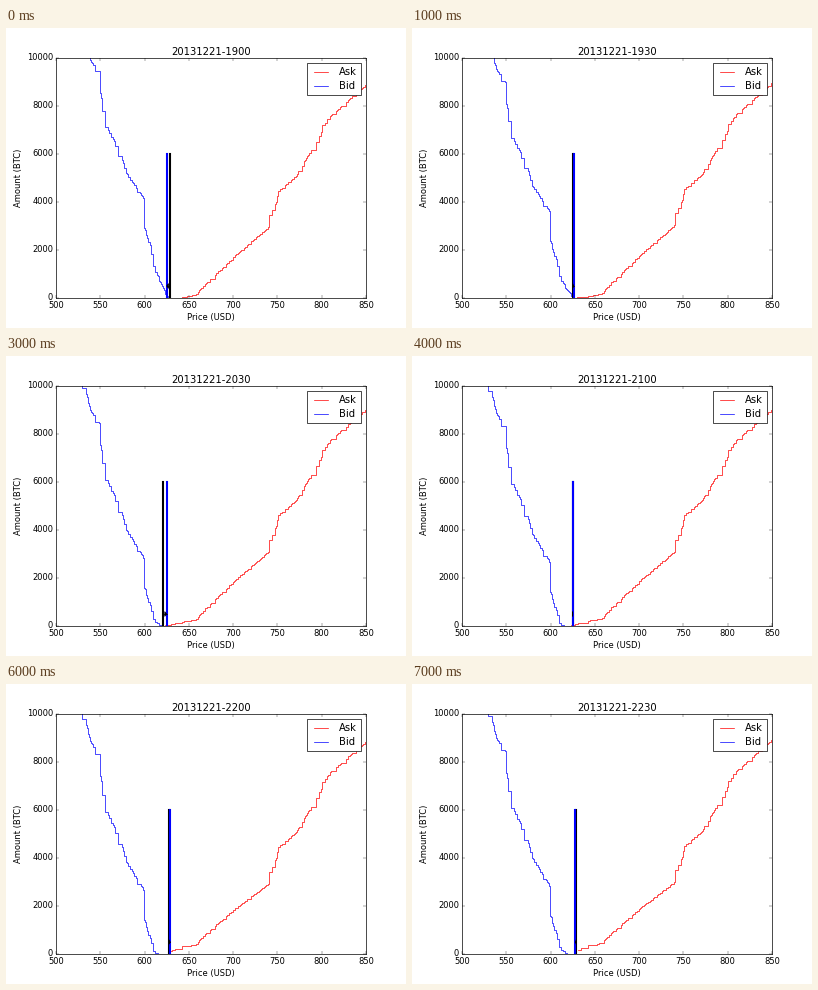
Animation of 400x300 px, one loop 8000 ms. Source, as a matplotlib script:

```python
import matplotlib.pyplot as plt
import numpy as np
from matplotlib.animation import FuncAnimation

plt.style.use("classic")
plt.rcParams.update({
    "figure.facecolor": "white",
    "savefig.facecolor": "white",
    "savefig.dpi": "figure",
    "font.family": "DejaVu Sans",
})

FRAMES = 8

# Key points of the order book (price, cumulative amount); walls are steep pairs
BID = np.array([
    (525, 10800), (534, 10000), (539.5, 9170), (549.5, 8630), (550.3, 7710),
    (560, 6120), (570, 5400), (581, 4170), (599.7, 3080), (600.4, 1830),
    (609.5, 830), (612, 480), (618.5, 125), (625, 0), (635, 0)])
ASK = np.array([
    (620, 0), (629, 0), (650, 70), (658, 160), (669, 610), (700, 1700),
    (739.5, 2950), (740.5, 3450), (749.5, 4050), (750.5, 4470), (770, 5050),
    (799.5, 6900), (800.5, 7180), (810, 7600), (849, 8870), (849.6, 9330),
    (851, 9330)])

# Trade price at each half hour; the next one is marked in blue
PRICE = [628.9, 625, 626.2, 621, 624.8, 625, 627.4, 629, 628]


def price_levels(points, seed):
    """Irregular price levels, including the key prices."""
    rng = np.random.default_rng(seed)
    lo, hi = points[0, 0], points[-1, 0]
    loose = lo + np.cumsum(rng.exponential(1.1, 500))
    return np.sort(np.concatenate([points[:, 0], loose[loose < hi]]))


BID_LEVELS = price_levels(BID, 4)
ASK_LEVELS = price_levels(ASK, 9)


def bid_depth(i):
    """Bids thin out, then recover a little."""
    p = BID_LEVELS
    drift = 60 * (i - 5) ** 2 - 460
    weight = np.interp(p, [535, 600], [0.7, 1.05]) * np.clip((628 - p) / 20, 0, 1)
    return np.maximum(np.interp(p, *BID.T) + drift * weight, 0)


def ask_depth(i):
    """Asks grow steadily near the market and waver far from it."""
    p = ASK_LEVELS
    near = 45 * i * np.clip((p - 620) / 20, 0, 1)
    far = np.interp(i, [0, 2, 4, 5, 7], [0, 150, 150, -80, 40])
    blend = np.clip((p - 660) / 80, 0, 1)
    return np.interp(p, *ASK.T) + near * (1 - blend) + far * blend


fig, ax = plt.subplots(figsize=(8, 6), dpi=50)
ask_line, = ax.plot([], [], "r", drawstyle="steps-post", label="Ask")
bid_line, = ax.plot([], [], "b", drawstyle="steps-pre", label="Bid")
now_line, = ax.plot([], [], "k", lw=3)
next_line, = ax.plot([], [], "b", lw=3)
shaft, = ax.plot([], [], "k")
head = ax.fill([0, 0, 0], [0, 0, 0], "k", zorder=3)[0]
ax.set_xlim(500, 850)
ax.set_ylim(0, 10000)
ax.set_xlabel("Price (USD)")
ax.set_ylabel("Amount (BTC)")
title = ax.set_title("")
ax.legend(loc="upper right", labelspacing=0.4)


def draw_arrow(start, end):
    step = np.sign(end - start) * min(2, abs(end - start))
    shaft.set_data([start, end], [500, 500])
    head.set_xy([(end, 500), (end - step, 600), (end - step, 400)])


def update(i):
    minutes = 19 * 60 + 30 * i
    title.set_text(f"20131221-{minutes // 60:02d}{minutes % 60:02d}")

    mid = 622 + 0.7 * (i - 3.5) ** 2
    keep = BID_LEVELS < mid
    bid_line.set_data(BID_LEVELS[keep], bid_depth(i)[keep])
    keep = ASK_LEVELS > mid
    ask_line.set_data(ASK_LEVELS[keep], ask_depth(i)[keep])

    now, later = PRICE[i], PRICE[i + 1]
    now_line.set_data([now, now], [0, 6000])
    next_line.set_data([later, later], [0, 6000])
    draw_arrow(now, later)


anim = FuncAnimation(fig, update, frames=FRAMES, interval=1000, repeat=True,
                     repeat_delay=0)
plt.show()
```
